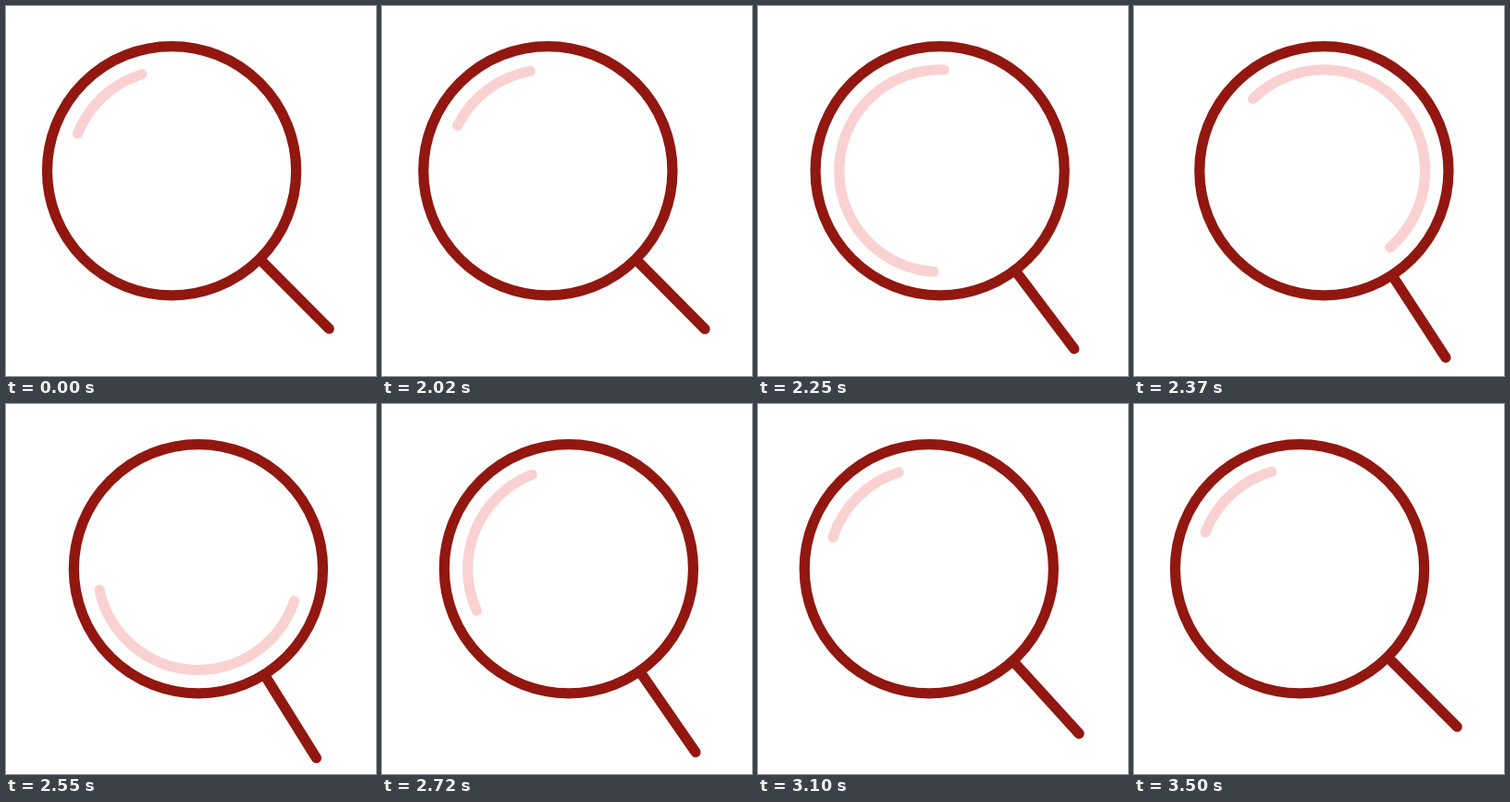
Recreate the animation shown at these times as an HTML page. Size 400 px wide and 400 px high, loop 3.52 s.

```html
<!DOCTYPE html>
<html lang="en">
<head>
<meta charset="utf-8">
<title>Magnifier</title>
<style>
  html, body { margin: 0; width: 100%; height: 100%; overflow: hidden; background: #fff; }
  svg { display: block; width: 100%; height: 100%; }
  svg * { fill: none; stroke-width: 11.2; stroke-linecap: round; }
  .frame { stroke: #911710; }
  .shine { stroke: #fad1d1; }
</style>
</head>
<body>
<svg viewBox="0 0 400 400">
  <g id="glass">
    <path id="shine" class="shine"/>
    <circle class="frame" r="134.6"/>
    <path id="handle" class="frame" d="M135 0H241"/>
  </g>
</svg>
<script>
const LOOP = 3520, PAUSE = 2000, STEP = 25;
const glass = document.getElementById('glass');
const shine = document.getElementById('shine');
const handle = document.getElementById('handle');

// Extra turn of each end of the shine: [ms, degrees, degrees per ms]
const LEAD = [[0, 0, 0.1], [25, 7, 0.5], [250, 379.5, 1.35], [550, 635, 0.55],
              [900, 740, -0.1], [1100, 719.7, -0.02], [1500, 721, 0]];
const TAIL = [[0, 0, 0.1], [25, 5, 0.4], [250, 252, 1.15], [550, 537, 0.8],
              [900, 736.5, -0.05], [1100, 716.6, -0.02], [1500, 719.5, 0]];

// Cubic Hermite curve through the keys
function curve(keys, t) {
  let i = 0;
  while (i < keys.length - 2 && t > keys[i + 1][0]) i++;
  const [t0, a, va] = keys[i], [t1, b, vb] = keys[i + 1];
  const d = t1 - t0, u = (t - t0) / d, w = 1 - u;
  return a * w * w * (1 + 2 * u) + b * u * u * (1 + 2 * w)
       + d * u * w * (va * w - vb * u);
}

// Same as cubic-bezier(x1, 0, x2, 1)
function ease(x, x1, x2) {
  let lo = 0, hi = 1;
  for (let i = 0; i < 24; i++) {
    const s = (lo + hi) / 2, r = 1 - s;
    if (3 * x1 * s * r * r + 3 * x2 * s * s * r + s * s * s < x) lo = s; else hi = s;
  }
  return lo * lo * (3 - 2 * lo);
}

function swing(t) {
  return t < 500 ? ease(t / 500, 0.3, 0.53) : 1 - ease((t - 500) / 1000, 0.26, 0.43);
}

function point(deg) {
  const a = deg * Math.PI / 180;
  return `${(109.3 * Math.cos(a)).toFixed(2)} ${(109.3 * Math.sin(a)).toFixed(2)}`;
}

function draw(time) {
  const t = Math.max(0, time % LOOP - PAUSE);
  // 40 poses a second, shown for 20 and 30 ms in turn
  const k = 2 * Math.floor(t / 50) + (t % 50 >= 20 ? 1 : 0);
  const ms = Math.min(1500, k * STEP);
  const p = swing(ms);
  const head = 252.9 + curve(LEAD, ms), tail = 201.6 + curve(TAIL, ms);
  glass.setAttribute('transform', `translate(${179.1 + 29.2 * p} 178.2)`);
  handle.setAttribute('transform', `rotate(${45.1 + 13.1 * p})`);
  shine.setAttribute('d',
    `M${point(tail)}A109.3 109.3 0 ${head - tail > 180 ? 1 : 0} 1 ${point(head)}`);
}

const start = performance.now();
function tick() {
  draw(performance.now() - start);
  requestAnimationFrame(tick);
}
tick();
</script>
</body>
</html>
```
